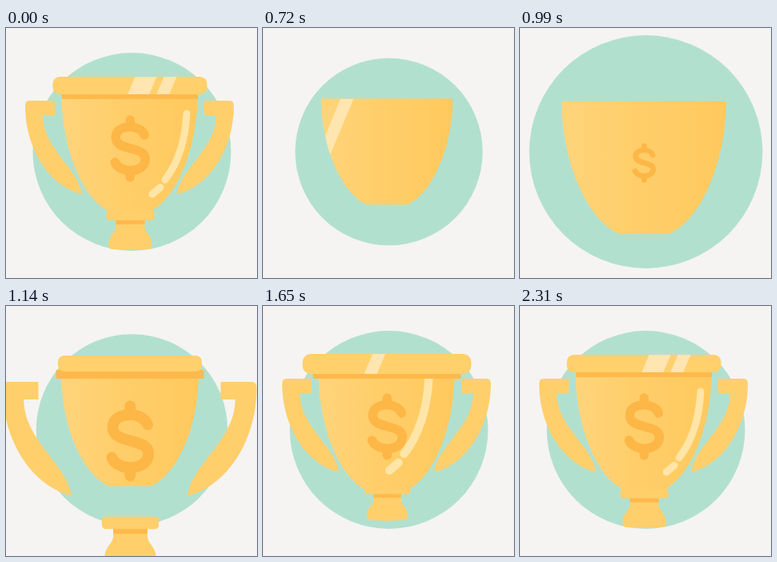
An HTML page for the animation above (3000 ms loop, 314 px wide and 313 px high).

```html
<!DOCTYPE html>
<html lang="en">
<head>
<meta charset="utf-8">
<title>Trophy</title>
<style>
  html, body { margin: 0; width: 100%; height: 100%; overflow: hidden; background: #f5f4f2; }
  svg { display: block; width: 100%; height: 100%; }
</style>
</head>
<body>
<svg viewBox="0 0 314 313">
  <defs>
    <linearGradient id="gold">
      <stop offset="0" stop-color="#ffd47a"/>
      <stop offset=".45" stop-color="#ffce6a"/>
      <stop offset="1" stop-color="#ffc95d"/>
    </linearGradient>
    <path id="bowl" d="M-85 0H85C85 60 60 122 26 137H-26C-60 122 -85 60 -85 0Z"/>
    <path id="handle" d="M0 0H-32Q-37 0 -37 6C-37 62 -5 108 34 117C30 85 -15 60 -15 18H0Z"/>
    <clipPath id="bowlClip"><use id="bowlMask" href="#bowl"/></clipPath>
    <clipPath id="sweepClip"><use href="#bowl"/></clipPath>
    <clipPath id="rimClip"><rect id="rimMask"/></clipPath>
  </defs>
  <g id="scene">
    <circle id="disc" cx="157.5" cy="155" fill="#b2e0cf"/>
    <use id="left" href="#handle" fill="#ffcf6c"/>
    <use id="right" href="#handle" fill="#ffcf6c"/>
    <g id="base" fill="#ffcf6b">
      <path d="M-18 10H18V19C18 25 27 30 27 38V41Q27 44 23 44.5Q0 46 -23 44.5Q-27 44 -27 41V38C-27 30 -18 25 -18 19Z"/>
      <rect x="-18" y="11" width="36" height="5.5" fill="#fdb94b"/>
      <rect x="-30" width="60" height="12" rx="4"/>
    </g>
    <g id="cup">
      <use href="#bowl" fill="url(#gold)"/>
      <g clip-path="url(#sweepClip)"><path id="sweep" fill="#ffe5b0" d="M20 0H37L-20 137H-36Z"/></g>
    </g>
    <path id="dollar" fill="none" stroke="#fdb747" stroke-width="11.5" stroke-linecap="round"
      d="M18 -17C13 -31 -18 -31 -18 -14C-18 4 19 -4 19 13C19 31 -13 32 -19 17M0 -36V-28M0 28V36"/>
    <g clip-path="url(#bowlClip)">
      <path id="gleam" fill="none" stroke="#ffe5a8" stroke-width="9" stroke-linecap="round"
        d="M226 107C224 145 213 172 199 190M193 199.5L183 208"/>
    </g>
    <rect id="shade" fill="#fdb94b" rx="1"/>
    <rect id="rim" fill="#ffd06c"/>
    <g clip-path="url(#rimClip)" fill="#ffe5b0">
      <path id="barA"/>
      <path id="barB"/>
    </g>
  </g>
</svg>
<script>
const LOOP = 3000, STEP = 30, START = 540, ASSEMBLE = 1050, CENTER = 155;
const el = Object.fromEntries([...document.querySelectorAll("[id]")].map(n => [n.id, n]));

const ramp = (t, from, to) => Math.min(1, Math.max(0, (t - from) / (to - from)));
const easeOut = (u, power) => 1 - (1 - u) ** power;
const smooth = u => u * u * (3 - 2 * u);

function set(node, attrs) {
  for (const name in attrs) node.setAttribute(name, attrs[name]);
}
const place = (node, x, y, sx, sy = sx) =>
  set(node, { transform: `translate(${x} ${y}) scale(${sx} ${sy})` });
const show = (node, on) => node.setAttribute("display", on ? "inline" : "none");
const box = (y, width, height) => ({ x: CENTER - width / 2, y, width, height });
const bar = (node, x, w) => set(node, { d: `M${x} 60h${w}l-11 26h${-w}Z` });

function draw(time) {
  const now = Math.floor(time / STEP) * STEP;
  const t = now < STEP ? LOOP : now;
  show(el.scene, t >= START);
  if (t < START) return;

  // Shared beats: every part is a sum of these.
  const grow = easeOut(ramp(t, START, 900), 2);
  const shrink = smooth(ramp(t, 900, 1170));
  const away = 1 - easeOut(ramp(t, ASSEMBLE, 1380), 5);
  const dip = smooth(ramp(t, 1140, 1380));
  const rise = smooth(ramp(t, 1380, 1650));
  const rest = easeOut(ramp(t, 1650, 2310), 3);
  const slide = 1 - easeOut(ramp(t, 1440, 2310), 7);
  const bump = Math.sin(Math.PI * rest);

  set(el.disc, { r: 2.5 + 153 * grow - 37 * shrink + 5.5 * rise });

  const size = .018 + 1.267 * grow - .285 * shrink;
  const cup = [CENTER - .5 * rise, 73 + 20.5 * grow - 6.5 * shrink - 2 * dip - rest,
    size - .06 * dip + .06 * rise, size + .03 * dip + .03 * rise];
  place(el.cup, ...cup);
  place(el.bowlMask, ...cup);
  place(el.sweep, 240 * ramp(t, 660, 1020) - 120, 0, 1);

  const pop = easeOut(ramp(t, 930, 1140), 2);
  place(el.dollar, CENTER + .3, 169 - 29 * dip + 11 * rise, 1.21 * pop - .35 * dip + .14 * rise);
  show(el.dollar, pop > 0);

  const handleX = 72 - 155 * away - 11 * rise - 7 * bump;
  const handleY = 88 + 35 * away + 3 * rise;
  const handleSize = .85 + 1.8 * away + .15 * rise + .04 * bump;
  place(el.left, handleX, handleY, handleSize);
  place(el.right, 309 - handleX, handleY, -handleSize, handleSize);
  place(el.base, CENTER + .5, 220 + 215 * away + 3.5 * rise + 4 * rest,
    .88 + 1.5 * away + .07 * rise + .05 * rest, .87 + 2.1 * away + .13 * rise + .11 * rest);
  for (const part of [el.left, el.right, el.base]) show(part, t > ASSEMBLE);

  const lid = easeOut(ramp(t, ASSEMBLE, 1140), 2);
  const rim = box(-40 + 102 * lid - 2 * rise + rest, 180 + 6 * dip + 25 * rise - 18 * rest, 20 + dip + 4 * rise - 3 * rest);
  rim.rx = rim.height * .4;
  set(el.rim, rim);
  set(el.rimMask, rim);
  set(el.shade, box(rim.y + rim.height - 2, 185 - 31 * (dip - rise) - 15 * rest, 11 - 3 * dip));

  const early = 1 - rest, zoom = 1 + .15 * early;
  set(el.gleam, { transform: `translate(${200 - 155 * slide} ${195 - 4 * early}) scale(${zoom}) translate(-200 -195)` });
  show(el.gleam, slide < 1);
  bar(el.barA, 162 - 172 * slide, 27 - 11 * early);
  bar(el.barB, 198 - 48 * early, 16 * rest);
}

const origin = performance.now();
function tick() {
  draw((performance.now() - origin) % LOOP);
  requestAnimationFrame(tick);
}
tick();
</script>
</body>
</html>
```
